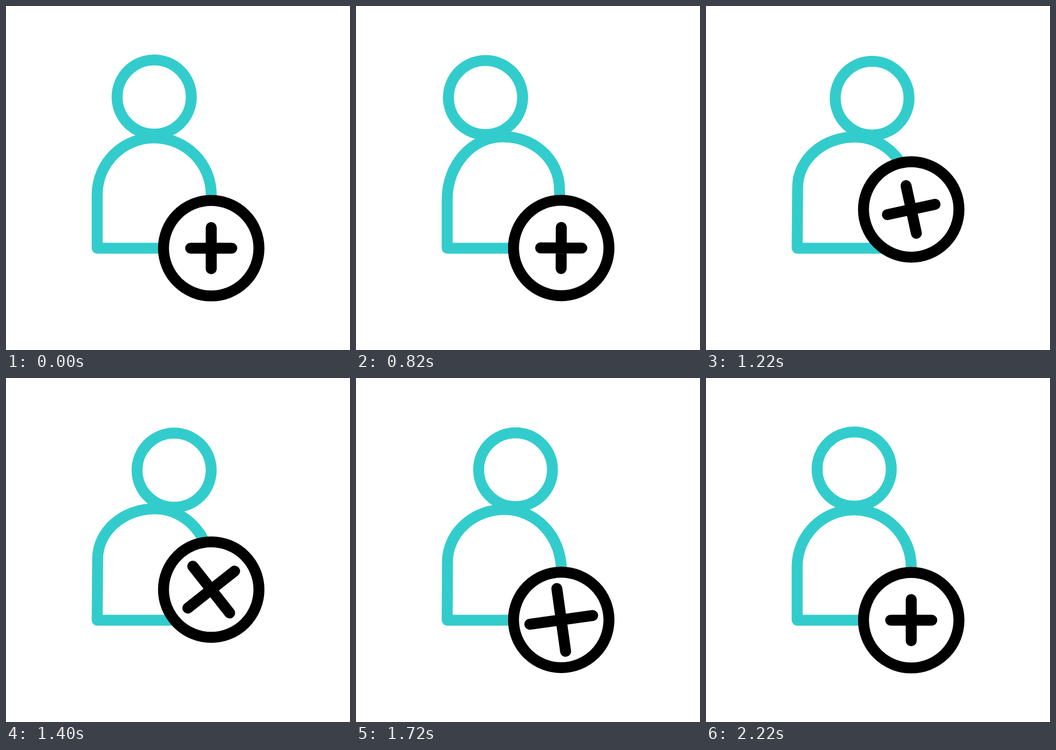
An HTML page that plays this animation: 640 px wide and 640 px high, repeating every 2400 ms.

```html
<!DOCTYPE html>
<html lang="en">
<head>
<meta charset="utf-8">
<title>Add user</title>
<style>
  html, body { margin: 0; width: 100%; height: 100%; overflow: hidden; background: #fff; }
  svg { display: block; width: 100%; height: 100%; }
  svg * { stroke-width: 20.4; stroke-linecap: round; stroke-linejoin: round; }
</style>
</head>
<body>
<svg viewBox="0 0 640 640">
  <g fill="none" stroke="#33cccc">
    <path id="body"/>
    <circle id="head"/>
  </g>
  <g id="badge" fill="#fff" stroke="#000">
    <circle r="88.8"/>
    <path id="plus"/>
  </g>
</svg>
<script>
const LOOP = 2400, STEP = 20;
const [body, head, badge, plus] =
  ['body', 'head', 'badge', 'plus'].map(id => document.getElementById(id));

// head: x, y; shoulders: left x, y, right x, y; arch top: x, y
const REST  = [275.7, 169.4, 169.6, 351.4, 381.8, 351.4, 275.7, 245.2];
const LEFT  = [240.6, 170.3, 169.6, 360,   378.5, 340,   273.5, 243.2];
const RIGHT = [314.1, 171.6, 170.6, 335.5, 382,   361,   277.5, 243.2];

// start, end, from, to, shrink of the head and sag of the arch midway
const LEANS = [
  [200, 600, REST, LEFT, 0.35, 0.5],
  [800, 1300, LEFT, RIGHT, 1.4, 2],
  [1300, 2200, RIGHT, REST, 0.35, 0.5]
];

const mix = (a, b, f) => a + (b - a) * f;

function ease(t, start, end) {
  const x = Math.min(1, Math.max(0, (t - start) / (end - start)));
  return x * x * (3 - 2 * x);
}

// Rises from 0 to 1 at the peak, then falls back
const pulse = (t, start, peak, end) => ease(t, start, peak) - ease(t, peak, end);

function drawPerson(t) {
  const lean = LEANS.filter(l => t >= l[0]).pop() || LEANS[0];
  const [start, end, from, to, shrink, sag] = lean;
  const f = ease(t, start, end), mid = 4 * f * (1 - f);
  const [hx, hy, lx, ly, rx, ry, ax, topY] = from.map((v, i) => mix(v, to[i], f));
  const ay = topY + sag * mid, k = 0.5523;

  head.setAttribute('cx', hx);
  head.setAttribute('cy', hy);
  head.setAttribute('r', 69 - shrink * mid);
  body.setAttribute('d',
    `M169.6 450.6L${lx} ${ly}` +
    `C${lx} ${mix(ly, ay, k)} ${mix(ax, lx, k)} ${ay} ${ax} ${ay}` +
    `C${mix(ax, rx, k)} ${ay} ${rx} ${mix(ry, ay, k)} ${rx} ${ry}` +
    'L381.8 450.6Z');
}

function drawBadge(t) {
  const y = 450.6 - 73 * pulse(t, 800, 1250, 1745);
  const arm = 38.3 + 23.1 * pulse(t, 1000, 1600, 2200);
  badge.setAttribute('transform', `translate(381.8 ${y})`);
  plus.setAttribute('d', `M${-arm} 0H${arm}M0 ${-arm}V${arm}`);
  plus.setAttribute('transform', `rotate(${360 * ease(t, 800, 2200)})`);
}

const begin = performance.now();

function draw() {
  const now = (performance.now() - begin) % LOOP;
  const t = Math.floor(now / STEP) * STEP;
  drawPerson(t);
  drawBadge(t);
  requestAnimationFrame(draw);
}
draw();
</script>
</body>
</html>
```
